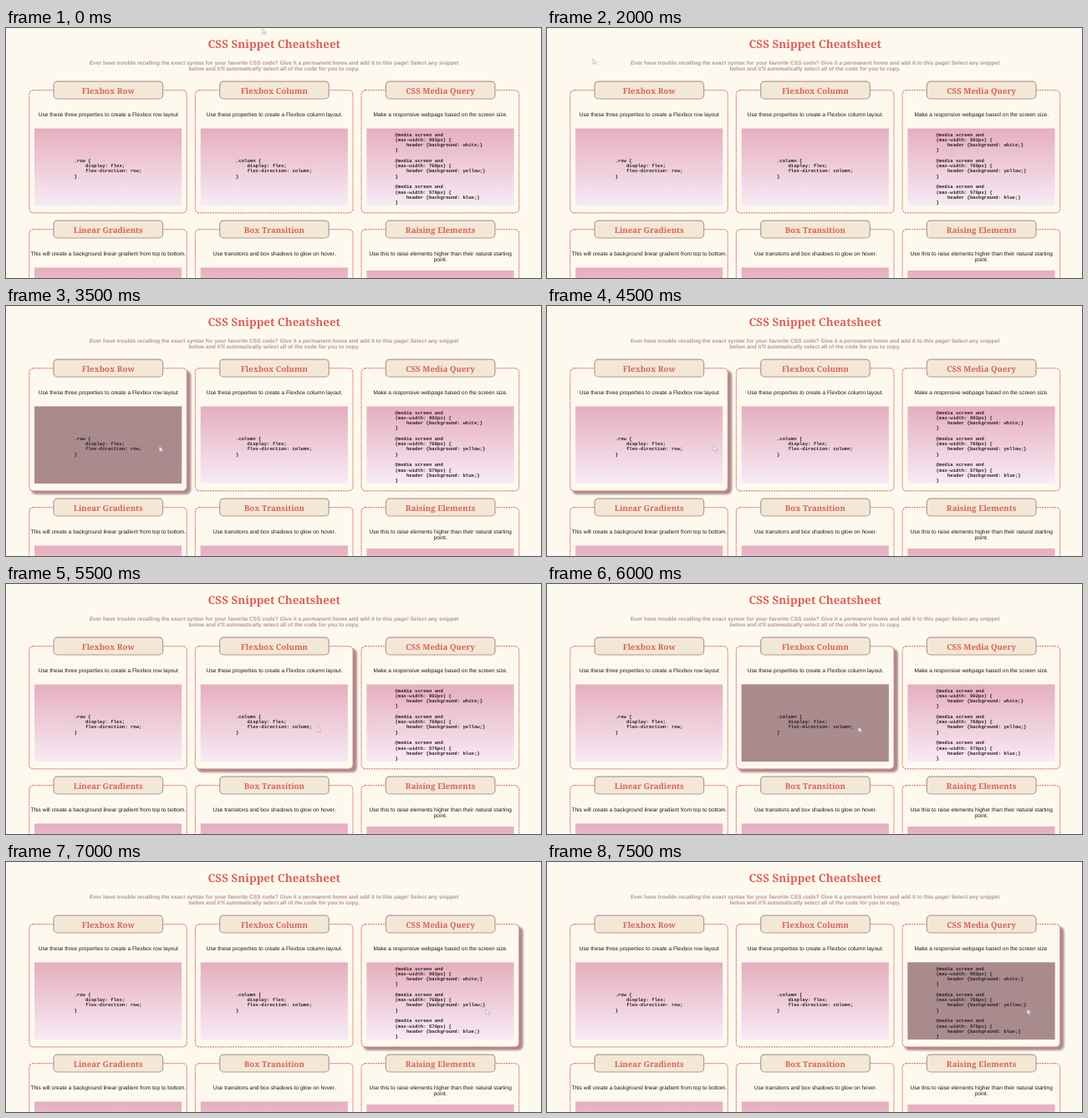
These frames come from a looping animation (640 by 300 pixels, 8000 ms). An HTML page:

```html
<!DOCTYPE html>
<html lang="en">
<head>
<meta charset="utf-8">
<title>CSS Snippet Cheatsheet</title>
<style>
html, body { margin: 0; width: 100%; height: 100%; overflow: hidden; background: #fef9ef; }
svg { display: block; width: 640px; height: 300px; }
text { text-rendering: geometricPrecision; white-space: pre; }
.title, .head { font-family: "Noto Serif", Cambria, serif; font-weight: 700; fill: #da6259; text-anchor: middle; }
.title { font-size: 13.4px; }
.head { font-size: 9.65px; }
.intro, .note { font-family: "Liberation Sans", Arial, sans-serif; font-size: 6.58px; text-anchor: middle; }
.intro { font-weight: 700; fill: #b39596; }
.note { fill: #1c1a19; }
.code { font: 700 5.63px "Liberation Mono", "Courier New", monospace; fill: #2a1f22; }
.card { fill: #fef9ef; stroke: #de7f74; stroke-width: 1.2; stroke-dasharray: 2 1; }
.tab { fill: #f3e8d6; stroke: #b59793; stroke-width: 1.2; }
.panel { fill: url(#pink); }
.shadow, .dark { fill: #aa8b8d; opacity: 0; animation: 8s step-end infinite; }
.shadow { filter: url(#soft); }

.shadow0 { animation-name: shadow0; }
.shadow1 { animation-name: shadow1; }
.shadow2 { animation-name: shadow2; }
.dark0 { animation-name: dark0; }
.dark1 { animation-name: dark1; }
.dark2 { animation-name: dark2; }
@keyframes shadow0 { 37.5% { opacity: 1 } 62.5% { opacity: 0 } }
@keyframes shadow1 { 68.75% { opacity: 1 } 81.25% { opacity: 0 } }
@keyframes shadow2 { 87.5%, 100% { opacity: 1 } }
@keyframes dark0 { 43.75% { opacity: 1 } 56.25% { opacity: 0 } }
@keyframes dark1 { 75% { opacity: 1 } 81.25% { opacity: 0 } }
@keyframes dark2 { 93.75%, 100% { opacity: 1 } }

.cursor { fill: #fff; stroke: #9c9498; stroke-width: .55; stroke-linejoin: round; animation: point 8s step-end infinite; }
@keyframes point {
  0% { transform: translate(306.7px, .8px) }
  12.5% { transform: translate(306.7px, -3px) }
  18.75% { transform: translate(306.7px, -20px) }
  25% { transform: translate(54.7px, 36.8px) }
  31.25% { transform: translate(28px, 60px) }
  37.5% { transform: translate(183.5px, 168.4px) }
  56.25% { transform: translate(199px, 167.6px) }
  62.5% { transform: translate(222px, 169px) }
  68.75% { transform: translate(372.5px, 171.4px) }
  81.25% { transform: translate(443.6px, 168.6px) }
  87.5%, 100% { transform: translate(574.4px, 176.4px) }
}
</style>
</head>
<body>
<svg id="stage" viewBox="0 0 640 300">
  <defs>
    <linearGradient id="pink" x2="0" y2="1">
      <stop stop-color="#e6aebf"/>
      <stop offset="1" stop-color="#f7ebf5"/>
    </linearGradient>
    <filter id="soft" x="-10%" y="-10%" width="120%" height="120%">
      <feGaussianBlur stdDeviation="1.2"/>
    </filter>
  </defs>
</svg>
<script>
const stage = document.getElementById('stage');

function add(name, attrs, content = '') {
  const el = document.createElementNS('http://www.w3.org/2000/svg', name);
  for (const key in attrs) el.setAttribute(key, attrs[key]);
  el.textContent = content;
  stage.append(el);
}
const rect = (cls, x, y, width, height, rx = 0) =>
  add('rect', { class: cls, x, y, width, height, rx });
const lines = (cls, x, y, step, list) =>
  list.forEach((line, i) => add('text', { class: cls, x, y: y + i * step }, line));

const media = (width, color) =>
  ['@media screen and', `(max-width: ${width}px) {`, `    header {background: ${color};}`, '}', ''];
const flex = (name) =>
  [`.${name} {`, '    display: flex;', `    flex-direction: ${name};`, '}'];

const cards = [
  { head: 'Flexbox Row', note: ['Use these three properties to create a Flexbox row layout'],
    code: flex('row'), codeX: 81.4 },
  { head: 'Flexbox Column', note: ['Use these properties to create a Flexbox column layout.'],
    code: flex('column'), codeX: 274.9 },
  { head: 'CSS Media Query', note: ['Make a responsive webpage based on the screen size.'],
    code: [...media(992, 'white'), ...media(768, 'yellow'), ...media(576, 'blue')], codeX: 465.4 },
  { head: 'Linear Gradients', note: ['This will create a background linear gradient from top to bottom.'] },
  { head: 'Box Transition', note: ['Use transitons and box shadows to glow on hover.'] },
  { head: 'Raising Elements', note: ['Use this to raise elements higher than their natural starting', 'point.'] }
];

lines('title', 320.7, 24.2, 0, ['CSS Snippet Cheatsheet']);
lines('intro', 320.7, 43.6, 7.5, [
  'Ever have trouble recalling the exact syntax for your favorite CSS code? Give it a permanent home and add it to this page! Select any snippet',
  "below and it'll automatically select all of the code for you to copy."
]);

cards.forEach(({ head, note, code, codeX }, i) => {
  const x = (i % 3) * 198.7;
  const y = i < 3 ? 0 : 167;
  const panelY = 120.5 + y + (note.length - 1) * 3.5;
  if (code) rect(`shadow shadow${i}`, x + 30, 77.5, 191.2, 148.6, 6);
  rect('card', x + 27.7, y + 74.7, 188.6, 147.2, 5);
  rect('tab', x + 57, y + 64.2, 130.6, 20.8, 4.5);
  lines('head', x + 122.2, y + 78.6, 0, [head]);
  lines('note', x + 122.3, y + 105.6, 7.5, note);
  rect('panel', x + 34, panelY, 176.2, 92.6);
  if (!code) return;
  rect(`dark dark${i}`, x + 34, panelY, 176.2, 92.6);
  lines('code', codeX, code.length > 4 ? 129.5 : 160.9, 6.28, code);
});

add('path', { class: 'cursor', d: 'M0 0V6.2L1.5 4.9 2.5 7 3.5 6.5 2.5 4.5H4.6Z' });
</script>
</body>
</html>
```
